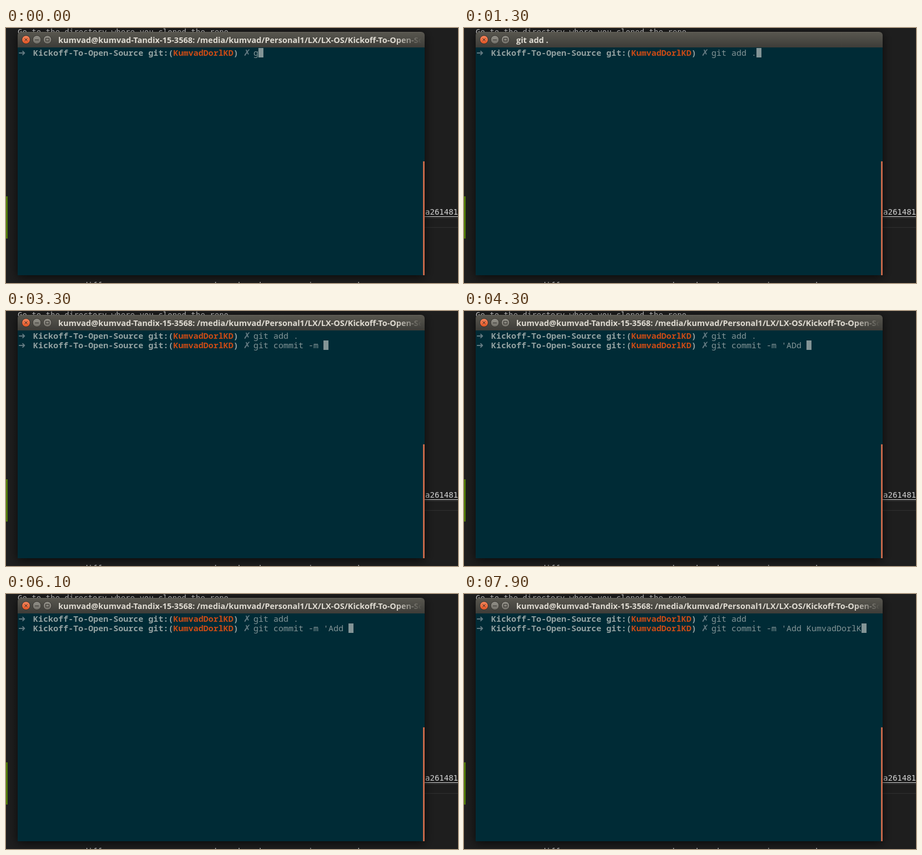
An HTML page with a canvas that plays this animation: 813x459 px, repeating every 8 s.

```html
<!DOCTYPE html>
<html lang="en">
<head>
<meta charset="utf-8">
<title>Terminal</title>
<style>
  html, body { margin: 0; width: 100%; height: 100%; overflow: hidden; background: #1e1e1e; }
  canvas { display: block; }
</style>
</head>
<body>
<canvas width="813" height="459"></canvas>
<script>
const ctx = document.querySelector('canvas').getContext('2d', { alpha: false });
const LOOP = 8000;
const CELL = 9, ROW = 17, LEFT = 22, TOP = 36, INPUT_COL = 47;
const EDITOR_FONT = '14px "DejaVu Sans Mono", monospace';
const TERMINAL_FONT = '15px "Noto Sans Mono", monospace';
const SYMBOL_FONT = '16px "DejaVu Sans", sans-serif';
const USER = 'KumvadDorlKD';
const TITLE = 'kumvad@kumvad-Tandix-15-3568: /media/kumvad/Personal1/LX/LX-OS/Kickoff-To-Open-Source';

// Each entry: start time, then the successive inputs, one every 100 ms.
const firstLine = typing([
  [0, 'g'], [200, 'git'], [400, 'git '],
  [700, 'git a', 'git ad', 'git add'], [1100, 'git add '], [1300, 'git add .'],
]);
const commit = "git commit -m '";
const secondLine = typing([
  [1400, ''], [1900, 'g', 'git', 'git '],
  [2300, 'git c', 'git co', 'git com', 'git comm', 'git commit'],
  [3000, 'git commit ', 'git commit -', 'git commit -m', 'git commit -m '],
  [3700, commit],
  [4000, ...['A', 'AD', 'ADd', 'ADd '].map(s => commit + s)],
  [4800, commit + 'ADd'],
  [5000, commit + 'AD', commit + 'A'],
  [5700, ...['AD', 'A', 'Ad', 'Add', 'Add '].map(s => commit + s)],
  [6400, ...prefixes(1, 6)],
  [7300, ...prefixes(7, 10)],
  [7900, ...prefixes(11, 11)],
]);

function prefixes(from, to) {
  return Array.from({ length: to - from + 1 }, (_, i) => commit + 'Add ' + USER.slice(0, from + i));
}

function typing(bursts) {
  return bursts.flatMap(([start, ...states]) => states.map((text, i) => ({ at: start + i * 100, text })));
}

function inputAt(line, t) {
  return line.findLast(state => state.at <= t).text;
}

function rect(x, y, w, h, color) {
  ctx.fillStyle = color;
  ctx.fillRect(x, y, w, h);
}

function label(text, x, y, font, color) {
  ctx.font = font;
  ctx.fillStyle = color;
  ctx.fillText(text, x, y);
}

function cells(text, col, row, color, weight = '') {
  label(text, LEFT + col * CELL, TOP + row * ROW + 14, `${weight} ${TERMINAL_FONT}`, color);
}

function vertical(y0, y1, ...colors) {
  const g = ctx.createLinearGradient(0, y0, 0, y1);
  colors.forEach((c, i) => g.addColorStop(i / (colors.length - 1), c));
  return g;
}

function drawEditor() {
  rect(0, 0, 813, 459, '#1e1e1e');
  label('Go to the directory where you cloned the repo', 21, 12, EDITOR_FONT, '#d4d4d4');
  label('-a261481', 745.6, 336, EDITOR_FONT, '#d4d4d4');
  rect(753, 339, 60, 1, '#d4d4d4');
  rect(753, 341, 60, 2, '#282828');
  rect(753, 358, 60, 2, '#282828');
  label('now open your diff as you can see on your branch and page, or in some and', 21, 468, EDITOR_FONT, '#d4d4d4');
  rect(0, 303, 3, 76, '#507a08');
}

function button(x, fill, icon) {
  ctx.beginPath();
  ctx.arc(x, 21, 7.5, 0, Math.PI * 2);
  ctx.fillStyle = fill;
  ctx.fill();
  ctx.strokeStyle = '#34322e';
  ctx.lineWidth = 1;
  ctx.stroke();
  ctx.stroke(new Path2D(icon));
}

function drawWindow(title) {
  ctx.save();
  ctx.shadowColor = 'rgba(0,0,0,.7)';
  ctx.shadowBlur = 18;
  ctx.shadowOffsetY = 3;
  ctx.beginPath();
  ctx.roundRect(21, 7, 732, 438, [6, 6, 0, 0]);
  ctx.fillStyle = vertical(7, 35, '#59574f', '#4b4a44', '#3d3c38');
  ctx.fill();
  ctx.restore();
  rect(27, 7, 720, 1, '#66645c');
  rect(21, 35, 732, 410, '#002b36');
  rect(750, 240, 3, 205, '#c6684a');

  button(36, vertical(13, 29, '#f58a62', '#e2511f'), 'M33.5 18.5l5 5m0-5l-5 5');
  const grey = vertical(13, 29, '#94928a', '#6f6d66');
  button(55.5, grey, 'M52 21.5h7');
  button(74.5, grey, 'M71.5 18.5h6v5h-6z');

  const fade = ctx.createLinearGradient(700, 0, 748, 0);
  fade.addColorStop(0, '#dfdbd2');
  fade.addColorStop(1, '#dfdbd200');
  ctx.save();
  ctx.beginPath();
  ctx.rect(94, 8, 653, 27);
  ctx.clip();
  label(title, 94, 27, 'bold 14.5px "Open Sans", sans-serif', fade);
  ctx.restore();
}

function drawPrompt(row, input, active) {
  const y = TOP + row * ROW;
  label('➜', LEFT, y + 14, SYMBOL_FONT, '#657b83');
  cells('Kickoff-To-Open-Source git:(', 3, row, '#93a1a1', 'bold');
  cells(USER, 31, row, '#cb4b16', 'bold');
  cells(')', 43, row, '#93a1a1', 'bold');
  label('✗', LEFT + 45 * CELL, y + 14, SYMBOL_FONT, '#657b83');
  cells(input, INPUT_COL, row, '#839496');
  if (active) rect(LEFT + (INPUT_COL + input.length) * CELL, y, CELL, ROW, '#839496');
}

function frame(now) {
  const t = now % LOOP;
  const onSecond = t >= 1400;
  drawEditor();
  drawWindow(t >= 1300 && !onSecond ? 'git add .' : TITLE);
  drawPrompt(0, inputAt(firstLine, t), !onSecond);
  if (onSecond) drawPrompt(1, inputAt(secondLine, t), true);
  requestAnimationFrame(frame);
}
requestAnimationFrame(frame);
</script>
</body>
</html>
```
